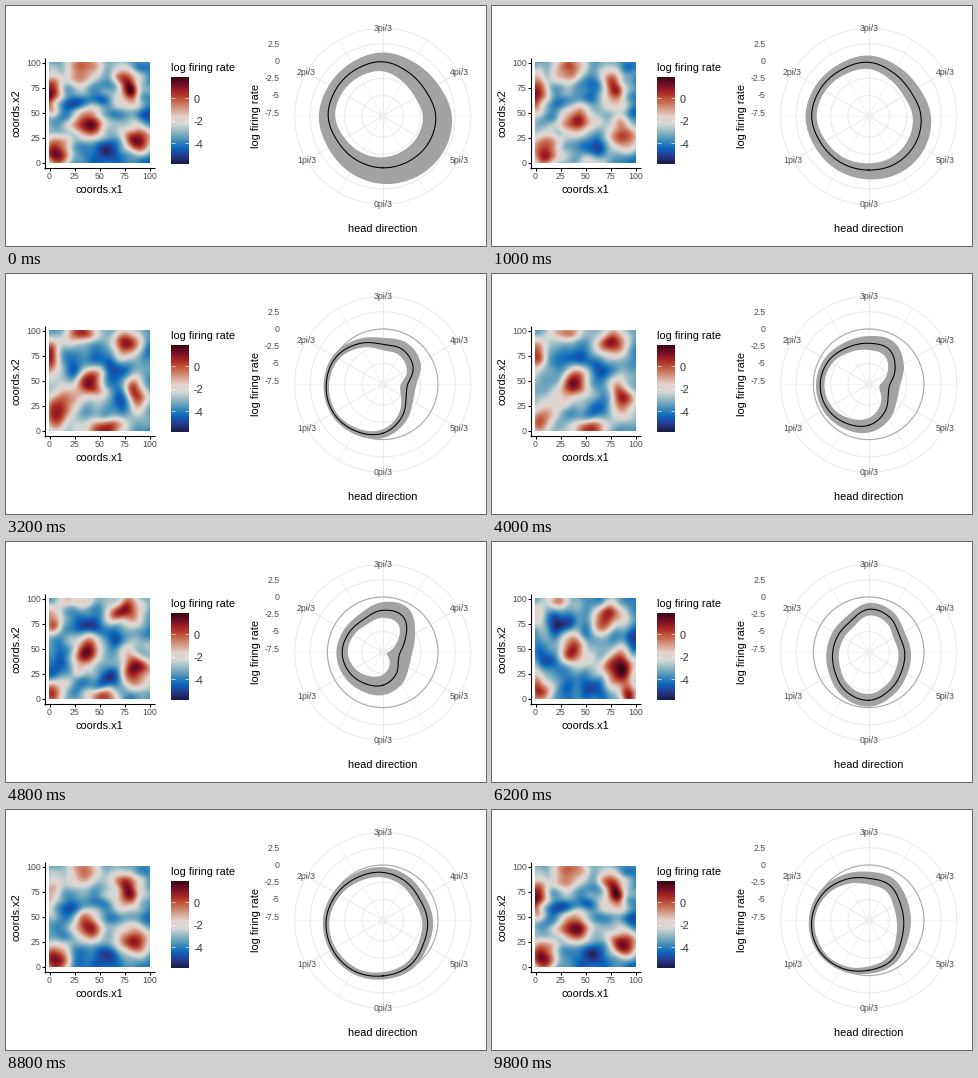
These frames come from a looping animation (480x240 px, 10000 ms). A matplotlib script:

```python
import numpy as np
import matplotlib.pyplot as plt
from matplotlib.animation import FuncAnimation
from matplotlib.colors import LinearSegmentedColormap
from matplotlib.patches import Circle, Polygon

W, H, DPI = 480, 240, 80
FRAMES, STEP = 50, 200
PX = 72 / DPI                      # points per pixel
KEYS = [0, 10, 16, 24, 31, 38, 49]
LOW, HIGH, BASE = -5.85, 1.8, -4.1
CX, CY, UNIT, RIM = 376.7, 110.3, 6.9, 88

plt.rcParams["font.family"] = "Liberation Sans"
balance = LinearSegmentedColormap.from_list("balance", [
    "#171c42", "#293a8f", "#0b66bd", "#4590b9", "#8eb5c2", "#d2d8d5",
    "#e6d2cc", "#d59d89", "#c46548", "#ac2b24", "#780e28", "#3c0911"])

fig = plt.figure(figsize=(W / DPI, H / DPI), dpi=DPI, facecolor="white")
ax = fig.add_axes([0, 0, 1, 1])
ax.axis("off")


def text(x, y, s, size=11, color="black", ha="center", **kw):
    kw.setdefault("va", "baseline")
    ax.text(x, y, s, fontsize=size * PX, color=color, ha=ha, **kw)


def label(x, y, s, ha="center"):
    text(x, y, s, 8.8, "#4d4d4d", ha)


def line(xs, ys, color="black", lw=1.07, z=2):
    ax.plot(xs, ys, color=color, lw=lw * PX, zorder=z, solid_capstyle="butt")


# --- firing rate map ---
gx, gy = np.meshgrid(np.linspace(0, 100, 101), np.linspace(0, 100, 101))


def ripple(rng, shortest, longest, n=14):
    out = np.zeros_like(gx)
    for _ in range(n):
        k = 2 * np.pi / rng.uniform(shortest, longest)
        a, p = rng.uniform(0, 2 * np.pi, 2)
        out += np.cos(k * (gx * np.cos(a) + gy * np.sin(a)) + p)
    return out / np.sqrt(n / 2)


def field(seed, *blobs):
    """Blobs are x, y, half width, half height, peak value, tilt in degrees."""
    rng = np.random.default_rng(seed)
    x = gx + 1.3 * ripple(rng, 22, 45)
    y = gy + 1.3 * ripple(rng, 22, 45)
    z = BASE + 0.25 * ripple(rng, 14, 40)
    for bx, by, a, b, peak, tilt in blobs:
        c, s = np.cos(np.radians(tilt)), np.sin(np.radians(tilt))
        u = ((x - bx) * c + (y - by) * s) / a
        v = ((y - by) * c - (x - bx) * s) / b
        z = z + (peak - BASE) * 0.4 ** (u * u + v * v)
    return z


map0 = field(1, (78, 75, 13, 19, 1.4, 15), (40, 39, 17, 15, 1.1, 10),
             (88, 24, 15, 12, 1.1, -20), (0, 68, 11, 19, 1.4, 0),
             (33, 94, 16, 17, 0.2, -15), (6, 9, 13, 16, 1.3, -15),
             (22, 56, 12, 9, -5.4, 0), (55, 62, 12, 10, -5.2, 0),
             (97, 48, 10, 10, -5.2, 0), (57, 13, 12, 11, -5.3, 0))
map1 = field(2, (33, 95, 15, 13, 0.7, 20), (77, 74, 11, 21, -0.4, 10),
             (44, 46, 18, 14, 0.9, 0), (87, 32, 13, 17, 0.8, 15),
             (12, 13, 18, 17, 0.8, -35), (0, 68, 12, 18, 0.7, 0),
             (57, 0, 18, 9, 0, 0), (54, 74, 11, 14, -5.2, 0),
             (22, 38, 9, 9, -4.9, 0), (62, 20, 10, 9, -5.2, 0))
map2 = field(3, (33, 98, 18, 11, 0.5, 0), (77, 87, 15, 14, 0.7, 30),
             (42, 46, 15, 15, 1.1, 0), (88, 35, 10, 18, 0.4, 10),
             (56, 1, 20, 12, 1.0, 0), (9, 20, 15, 23, 0.8, -15),
             (0, 74, 11, 17, 0.7, 0), (57, 68, 13, 12, -5.3, 0),
             (65, 36, 9, 14, -5.1, 0), (23, 58, 10, 10, -5.1, 0))
map3 = field(4, (76, 89, 17, 15, 1.2, 15), (38, 46, 15, 15, 1.2, -35),
             (86, 31, 15, 20, 1.2, 20), (2, 76, 10, 14, 0.3, 0),
             (25, 98, 17, 9, -1.3, 0), (52, 0, 16, 8, 0.1, 0),
             (4, 5, 12, 12, 0.6, 0), (26, 27, 8, 8, -1.9, 0),
             (60, 23, 11, 11, -5.3, 0), (14, 38, 10, 10, -5.3, 0),
             (42, 73, 16, 8, -5.3, 0), (63, 54, 9, 13, -5.2, 0))
map4 = field(5, (73, 82, 16, 13, 0.8, 15), (38, 48, 14, 14, 0.9, 0),
             (84, 30, 19, 17, 1.6, -15), (94, 2, 9, 11, 0.6, 0),
             (4, 9, 12, 17, 0.7, 0), (24, 98, 15, 10, -1.2, 0),
             (0, 82, 9, 13, -1.5, 0), (28, 75, 11, 9, -5.4, 0),
             (17, 34, 9, 12, -5.0, 0), (97, 60, 10, 10, -5.2, 0),
             (60, 11, 10, 10, -5.1, 0))
map5 = field(6, (75, 77, 20, 15, 1.1, -15), (38, 43, 12, 16, 0.8, 0),
             (80, 28, 18, 15, 1.0, 10), (4, 5, 14, 16, 1.4, -25),
             (33, 98, 13, 12, -0.2, 0), (8, 87, 12, 10, -2.2, 0),
             (17, 29, 10, 10, -5.5, 0), (31, 10, 10, 9, -5.1, 0),
             (56, 55, 9, 12, -5.1, 0), (58, 10, 9, 9, -5.1, 0),
             (15, 62, 10, 9, -5.0, 0))
maps = [map0, map1, map2, map3, map4, map5, map0]

heat = ax.imshow(map0, cmap=balance, vmin=LOW, vmax=HIGH, origin="lower",
                 extent=(43, 144, 157.3, 56.6), aspect="auto",
                 interpolation="bilinear", zorder=1)

line([38.5, 38.5], [51.5, 162.9])
line([38, 149], [162.4, 162.4])
for v in range(0, 101, 25):
    px, py = 43.5 + v, 157 - v
    line([px, px], [162.4, 165.4])
    line([35.6, 38.5], [py, py])
    label(px, 173, v)
    label(34.6, py + 3.2, v, "right")
text(93.3, 187, "coords.x1")
text(10.5, 107.5, "coords.x2", rotation=90, va="center")

# --- colour bar ---
text(165, 65.3, "log firing rate", ha="left")
ax.imshow(np.linspace(LOW, HIGH, 256)[:, None], cmap=balance, origin="lower",
          extent=(165.3, 182.6, 158, 71.6), aspect="auto", zorder=1)
for v in (0, -2, -4):
    y = 92.2 - 11.25 * v
    for x in (165.3, 179.1):
        line([x, x + 3.5], [y, y], "white", 0.6)
    text(188, y + 4.4, v, color="#333333", ha="left")

# --- polar chart ---
theta = np.linspace(0, 2 * np.pi, 361)


def polar(r, a=theta):
    return np.column_stack([CX - r * np.sin(a), CY + r * np.cos(a)])


def smooth(points):
    """Closed curve through evenly spaced radii."""
    p = np.asarray(points, float)
    n = len(p)
    t = theta / (2 * np.pi) * n
    i = np.floor(t).astype(int)
    f = t - i
    a, b, c, d = (p[(i + k) % n] for k in (-1, 0, 1, 2))
    return b + 0.5 * f * (c - a + f * (2 * a - 5 * b + 4 * c - d
                                       + f * (3 * (b - c) + d - a)))


def lobe(mean, amp=0, peak=0):
    return mean + amp * np.cos(theta - peak * np.pi / 6)


def curve(points, up, down):
    mid = smooth(points)
    return np.array([mid, mid + lobe(*up), mid - lobe(*down)])


ring0 = curve([51.5, 51, 51.5, 54.5, 54, 54, 54.5, 51, 50, 53, 53, 52],
              (12.7, 4.8, 10.5), (10, 3, 9.3))
ring1 = curve([56, 57, 58, 59.5, 57, 54, 53.5, 49, 47.5, 51.5, 55, 57],
              (3.4, 0.9, 7), (3.4, 0.6, 7.5))
ring2 = curve([49, 54, 57, 56.5, 54, 47, 40, 40, 35, 25, 27, 38],
              (5.6, 3.2, 8.5), (4.9, 2.2, 8.2))
ring3 = curve([33, 36, 39, 40.5, 39, 38, 42, 41, 26, 17.5, 18, 26],
              (9, 3.3, 9.5), (9, 3.7, 9.8))
ring4 = curve([48, 45, 39, 36, 35, 36, 43, 41, 35, 36, 38, 43],
              (6.3,), (6.3,))
ring5 = curve([62.5, 62, 58, 56, 53, 53, 55, 50, 50.5, 56.5, 58, 61],
              (3.7,), (3.7,))
ring6 = curve([50, 55, 58, 57, 53, 47, 42, 41, 36, 35, 38, 46],
              (5, 2.7, 7.8), (5, 2.3, 8))
rings = [ring0, ring1, ring2, ring3, ring4, ring5, ring6]


def circle(r, color):
    ax.add_patch(Circle((CX, CY), r, fill=False, ec=color, lw=1.07 * PX,
                        zorder=2))


for v in (-7.5, -5, -2.5, 0, 2.5):
    r = 55.3 + UNIT * v
    circle(r, "#ebebeb")
    label(273.5, CY - r + 2.9, v, "right")
circle(RIM, "#ebebeb")
for k in range(12):
    x, y = polar(RIM, k * np.pi / 6)[0]
    line([CX, x], [CY, y], "#ebebeb", 0.55 if k % 2 else 1.07)
    if k % 2 == 0:
        label(x, y + 3.1, f"{k // 2}pi/3")
circle(55.3, "#a8a8a8")
text(CX - 0.5, 226, "head direction")
text(250, 110.5, "log firing rate", rotation=90, va="center")

band = ax.add_patch(Polygon(polar(55), closed=True, fc="#a3a3a3", ec="none",
                            zorder=3))
mean, = ax.plot([], [], color="black", lw=1.07 * PX, zorder=4)

ax.set_xlim(0, W)
ax.set_ylim(H, 0)


def blend(items, frame):
    i = min(np.searchsorted(KEYS, frame, side="right") - 1, len(KEYS) - 2)
    f = (frame - KEYS[i]) / (KEYS[i + 1] - KEYS[i])
    return items[i] * (1 - f) + items[i + 1] * f


def draw(frame):
    heat.set_data(blend(maps, frame))
    mid, top, low = blend(rings, frame)
    band.set_xy(np.vstack([polar(top), polar(low)[::-1]]))
    mean.set_data(*polar(mid).T)
    return heat, band, mean


anim = FuncAnimation(fig, draw, frames=FRAMES, interval=STEP,
                     init_func=lambda: draw(0), repeat=True, repeat_delay=0)
plt.show()
```
